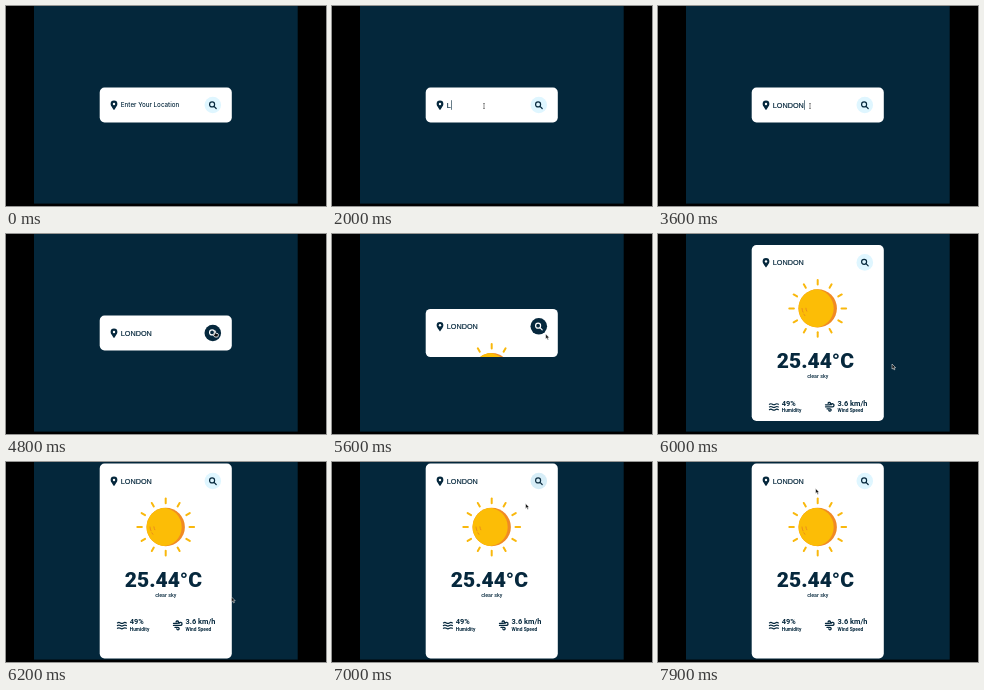
An HTML page for the animation above (8 s loop, 320 px wide and 200 px high).

```html
<!DOCTYPE html>
<html lang="en">
<head>
<meta charset="utf-8">
<title>Weather card</title>
<style>
html, body { margin: 0; width: 100%; height: 100%; overflow: hidden; background: #000; }
svg { display: block; width: 100%; height: 100%; }
text { font-family: Roboto, sans-serif; font-weight: 500; fill: #06283d; }
.hint { font: 500 6.25px Inter, sans-serif; }
.city { font: 400 7.25px "Liberation Sans", sans-serif; stroke: #06283d; stroke-width: .18px; }
.temp { font-size: 21px; font-weight: 800; }
.value { font-size: 7.4px; font-weight: 600; }
.label { font-size: 4.8px; font-weight: 600; }
.line { fill: none; stroke: #06283d; stroke-linecap: round; stroke-linejoin: round; }
</style>
</head>
<body>
<svg viewBox="0 0 320 200">
  <defs>
    <clipPath id="clip"><rect id="mask" x="93.7" width="132.1" rx="4.8"/></clipPath>
    <clipPath id="disc"><circle cx="159.7" cy="65" r="19.2"/></clipPath>
  </defs>
  <rect x="28" width="263.7" height="197.6" fill="#04273b"/>
  <rect id="card" x="93.7" width="132.1" rx="4.8" fill="#fff"/>
  <g clip-path="url(#clip)">
    <g id="content">
      <path d="M108 24.2C106.4 21.6 104.6 20 104.6 18a3.4 3.4 0 0 1 6.8 0C111.4 20 109.6 21.6 108 24.2Z" fill="#06283d"/>
      <circle cx="108" cy="18" r="1.2" fill="#fff"/>
      <text class="hint" id="hint" x="114.8" y="21.2">Enter Your Location</text>
      <text class="city" id="city" x="114.8" y="21.8"></text>
      <rect id="caret" y="14.2" width=".6" height="9.6" fill="#06283d"/>
      <circle id="button" cx="206.8" cy="19" r="8.3"/>
      <g id="lens" fill="none" stroke-width="1.2" stroke-linecap="round">
        <circle cx="206.1" cy="18.4" r="2.5"/>
        <path d="M208 20.3l2.2 2.2"/>
      </g>
      <g id="weather">
        <g id="rays" stroke="#f9b80d" stroke-width="2" stroke-linecap="round"></g>
        <circle cx="159.7" cy="65" r="19.2" fill="#f08a24"/>
        <circle cx="156.4" cy="65" r="19.3" fill="#fcbd06" clip-path="url(#disc)"/>
        <path d="M144 65q.2 2.2 1 3.8M145.9 70.8l1 1.5M147.9 64.8q.2 1.8.9 3" fill="none" stroke="#e88a1c" stroke-width=".9" stroke-linecap="round"/>
        <text class="temp" x="118.8" y="125">25.44°C</text>
        <text x="159.7" y="135" font-size="5.3" text-anchor="middle">clear sky</text>
        <g id="waves" class="line" stroke-width="1.15"></g>
        <text class="value" x="123.8" y="162.3">49%</text>
        <text class="label" x="123.8" y="168.5">Humidity</text>
        <path class="line" stroke-width="1.3" d="M167.5 161.4h3.8a1.2 1.2 0 1 0-1.2-1.5M167.5 163.4h7a1.5 1.5 0 1 0-1.4-2M169 165.4h3a1.2 1.2 0 1 1-1.2 1.5"/>
        <text class="value" x="179.6" y="162.3">3.6 km/h</text>
        <text class="label" x="179.6" y="168.5">Wind Speed</text>
      </g>
    </g>
  </g>
  <g id="cursor">
    <path id="arrow" d="M0 0V5.1L1.2 4 2 5.9 2.9 5.5 2.1 3.7H3.7Z" fill="#111" stroke="#fff" stroke-width=".5"/>
    <path id="beam" d="M-1-2.6Q0-2.6 0-2V2Q0 2.6-1 2.6M1-2.6Q0-2.6 0-2M0 2Q0 2.6 1 2.6" fill="none" stroke="#444" stroke-width=".6"/>
    <path id="hand" d="M-.6 0Q0-.7.6 0V2.2L3 2.7Q3.6 3 3.4 4L2.8 6H-.3L-2 3.7Q-1.8 2.8-.6 3.6Z" fill="#111" stroke="#fff" stroke-width=".8"/>
  </g>
</svg>
<script>
const $ = id => document.getElementById(id);
const LOOP = 8000, STEP = 100;
const MIDDLE = 99, OPEN_TOP = 1.6, CLOSED = 34.8;
const CITY = "LONDON", TYPE_START = 1970, KEY_TIME = 215;
const DARK = [6, 40, 61], PALE = [223, 246, 255], WHITE = [255, 255, 255];

const ENTRY = { x: 173, y: 138 };
const moves = [
  { at: 300, time: 300, x: 152, y: 100, bow: -0.8 },   // into the field
  { at: 3600, time: 400, x: 226, y: 102, bow: 0 },     // past the button
  { at: 4200, time: 600, x: 209, y: 97, bow: 0 },      // onto the button
  { at: 5500, time: 450, x: 234, y: 130, bow: -0.12 }, // out of the card
  { at: 6000, time: 200, x: 225.5, y: 135, bow: 0 },
  { at: 6200, time: 500, x: 121, y: 158, bow: -0.1 },  // along the details
  { at: 6700, time: 400, x: 207, y: 20, bow: 0 },      // back to the button
  { at: 7200, time: 700, x: 157.6, y: 26.5, bow: -0.4 }
];

const clamp = v => Math.min(1, Math.max(0, v));
const smooth = p => p * p * (3 - 2 * p);
const easeOut = p => 1 - (1 - p) ** 1.7;
const ramp = (t, start, time) => smooth(clamp((t - start) / time));
const mix = (a, b, p) => `rgb(${a.map((v, i) => Math.round(v + (b[i] - v) * p))})`;
const show = (id, on) => $(id).setAttribute("visibility", on ? "visible" : "hidden");
const set = (id, attrs) => {
  for (const k in attrs) $(id).setAttribute(k, attrs[k]);
};

// Each move eases to its end point along a bowed line.
function position(t) {
  return moves.filter(m => m.at <= t).reduce((from, m) => {
    const p = ramp(t, m.at, m.time), side = m.bow * Math.sin(Math.PI * p);
    const dx = m.x - from.x, dy = m.y - from.y;
    return { x: from.x + dx * p - dy * side, y: from.y + dy * p + dx * side };
  }, ENTRY);
}

function drawCursor(t, row) {
  const visible = t >= moves[0].at;
  const { x, y } = position(t);
  const hand = Math.hypot(x - 206.8, y - row) < 8.3;
  const beam = !hand && x > 114 && x < 196 && Math.abs(y - row) < 6.5;
  set("cursor", { transform: `translate(${x} ${y})` });
  show("hand", visible && hand);
  show("beam", visible && beam);
  show("arrow", visible && !hand && !beam);
}

function drawField(t) {
  const typed = Math.max(0, Math.floor((t - TYPE_START) / KEY_TIME) + 1);
  const typing = typed > 0 && typed < CITY.length;
  const blinkStart = typed ? 3100 : 900;
  const lit = t >= blinkStart && (t - blinkStart) % 1100 < 600;
  $("city").textContent = CITY.slice(0, typed);
  show("hint", typed === 0);
  set("caret", { x: 115 + $("city").getComputedTextLength() });
  show("caret", t < 4700 && (typing || lit));
}

function render(t) {
  const full = 2 * (MIDDLE - OPEN_TOP);
  const height = CLOSED + (full - CLOSED) * easeOut(clamp((t - 5570) / 600));
  const y = MIDDLE - height / 2, shift = y - OPEN_TOP;
  for (const id of ["card", "mask"]) set(id, { y, height });
  set("content", { transform: `translate(0 ${shift})` });
  show("weather", t >= 5600);

  const hover = ramp(t, 4150, 400) - ramp(t, 5600, 400) + ramp(t, 6950, 400) - ramp(t, 7250, 400);
  set("button", { fill: mix(PALE, DARK, hover) });
  set("lens", { stroke: mix(DARK, WHITE, hover) });
  drawField(t);
  drawCursor(t, 19 + shift);
}

const repeat = (n, draw) => Array.from({ length: n }, (_, i) => draw(i)).join("");
$("rays").innerHTML = repeat(12, i =>
  `<path d="M159.7 41.2v${i % 3 ? -4 : -4.6}" transform="rotate(${i * 30} 159.7 65)"/>`);
$("waves").innerHTML = repeat(3, i =>
  `<path d="M111.4 ${160.9 + i * 2.7}q1.5-1 3 0t3 0 3 0"/>`);

// The picture advances ten times a second.
function tick() {
  render(Math.floor(performance.now() % LOOP / STEP) * STEP);
  requestAnimationFrame(tick);
}
tick();
</script>
</body>
</html>
```
